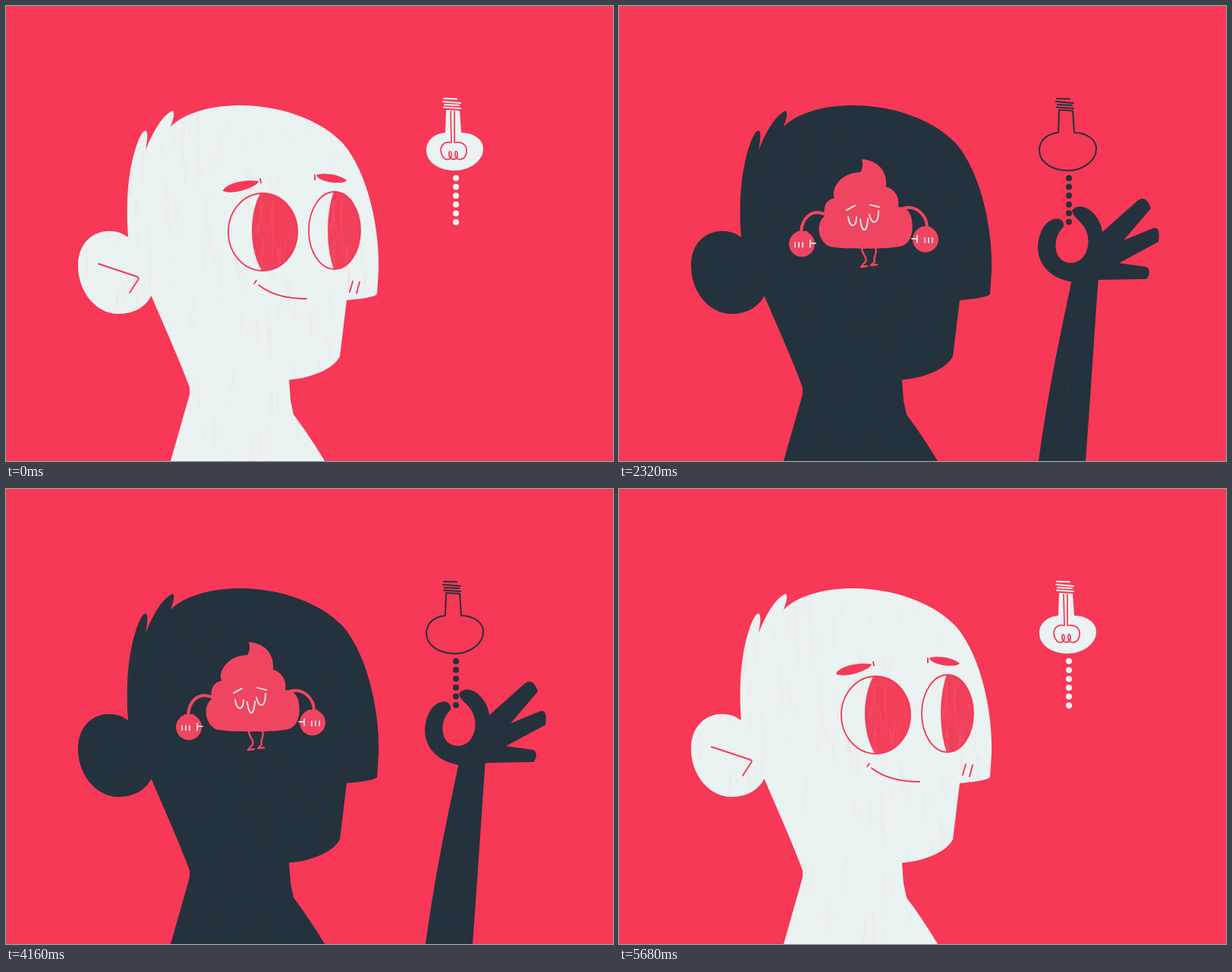
Write an HTML page with a canvas that moves like this. It is 800 px wide and 600 px high and loops after 5760 ms.

```html
<!DOCTYPE html>
<html lang="en">
<head>
<meta charset="utf-8">
<title>Bright idea</title>
<style>
html, body { margin: 0; width: 100%; height: 100%; overflow: hidden; background: #f73856; }
canvas { display: block; width: 800px; height: 600px; }
</style>
</head>
<body>
<canvas id="stage" width="800" height="600"></canvas>
<script>
const ctx = document.getElementById('stage').getContext('2d');
const LOOP = 5760, STEP = 40;
const RED = '#f73856', WHITE = '#ebf2f2', DARK = '#24323d', PINK = '#f04560';
const path = d => new Path2D(d);

const head = path(
  'M217 600L242 512V503C230 470 211 428 191 381L161 305C158 260 160 220 172 184' +
  'C176 172 180 165 184 164C188 167 186 178 184 190C192 170 205 144 220 138' +
  'C223 143 220 150 217 159C235 141 270 131 310 131C363 132 413 149 444 181' +
  'C479 222 493 300 491 350L489 380C485 384 470 386 449 388L440 462' +
  'C432 478 405 490 373 493L375 520L379 539C395 560 408 580 420 600Z' +
  'M192 381C186 394 172 406 148 406C118 406 93 375 95 338C98 296 140 288 161 305L200 340Z');

const faceLines = path(
  'M122 340L173 357Q176 358 174 361L163 378M333 368C348 380 370 386 396 386' +
  'M330 362L327 366M457 363L453 377M466 364L462 379M335 228L336 233M407 223V229');
const brows = path(
  'M286 244C288 236 310 228 333 231C332 238 300 250 286 244Z' +
  'M409 223C418 219 440 222 449 230C445 236 412 233 409 223Z');

const eyes = [
  { x: 338.5, y: 298, rx: 45.5, ry: 51, pw: 45, ph: 75, right: 369, left: 316 },
  { x: 433, y: 296, rx: 34, ry: 51, pw: 34, ph: 80, right: 458, left: 411 }
];

const bulb = path(
  'M580 137L598 138L600 167C616 167 629 176 629 188C629 205 610 217 592 217' +
  'C572 217 554 207 554 190C554 176 566 168 579 167Z');
const thread = path('M577 122L594 122.5M576 126L599 128M578 130L597 131M577 133.5L599 135');
const filament = path(
  'M586 139L587 180C576 178 571 186 574 195C577 204 586 205 587 197C587 190 583 190 584 197' +
  'C586 204 595 204 595 196C595 190 591 190 592 197C595 205 605 204 607 193C608 184 602 178 591 180V139');

const openHand = path(
  'M573 281C582 278 587 284 586 291C577 300 573 312 577 326C583 341 600 342 610 333' +
  'C621 322 621 302 612 290C605 280 598 278 597 270C602 262 615 263 624 272C632 280 636 289 637 298' +
  'L682 258C688 252 696 251 701 267L665 309L704 293C711 291 713 297 711 311L659 339' +
  'L695 344C701 347 699 357 695 360L638 361L600 364C575 362 552 345 552 318C553 300 560 285 573 281Z');
const closedHand = path(
  'M592 269C570 266 557 290 556 315C556 340 570 360 600 362L638 358L695 355C700 351 701 339 695 336' +
  'L659 333L709 304C711 292 709 284 702 287L664 303L695 261C691 246 683 245 677 251L637 296' +
  'C635 288 632 283 628 279C616 266 602 264 592 269Z' +
  'M594 286C606 284 617 298 617 315C616 330 607 338 598 337C586 336 580 323 580 310C580 298 585 290 594 286Z');
const arm = path('M598 355C587 410 568 490 553 600L541 660H610L615 600C621 520 626 440 632 355Z');

const body = path(
  'M320 202C343 203 354 220 352 238C364 242 370 252 368 265C377 265 382 269 385 278' +
  'C389 294 386 311 374 316C362 321 292 321 277 317C261 309 260 285 271 277C269 264 273 255 284 253' +
  'C279 240 293 219 318 219Q323 212 320 202Z');
const faceMarks = path(
  'M300 269L311 263M331 262L343 265M302 278C304 293 313 293 313 278' +
  'M330 275C333 289 342 289 342 270M318 281C320 300 327 300 328 280');
const legs = path(
  'M320 319C320 328 328 331 325 337L319 344L327 343M338 319C341 328 334 331 337 337L332 342L340 341');

const clamp = p => Math.max(0, Math.min(1, p));
const span = (t, a, b) => clamp((t - a) / (b - a));
const ease = p => (1 - Math.cos(Math.PI * p)) / 2;

function rng(seed) {
  let s = seed * 7919 + 17;
  return () => (s = (s * 16807) % 2147483647) / 2147483647;
}

function stroke(p, color, width) {
  ctx.strokeStyle = color;
  ctx.lineWidth = width;
  ctx.stroke(p);
}

function fill(p, color, rule = 'nonzero') {
  ctx.fillStyle = color;
  ctx.fill(p, rule);
}

// Faint crayon streaks inside a shape.
function crayon(p, [x, y, w, h], count, color, seed, rule = 'nonzero') {
  const rnd = rng(seed);
  ctx.save();
  ctx.clip(p, rule);
  ctx.strokeStyle = color;
  for (let i = 0; i < count; i++) {
    const sx = x + rnd() * w, sy = y + rnd() * h, len = 10 + rnd() * 35;
    ctx.lineWidth = 1 + rnd() * 4;
    ctx.beginPath();
    ctx.moveTo(sx, sy);
    ctx.lineTo(sx + rnd() * 8 - 4, sy + len);
    ctx.stroke();
  }
  ctx.restore();
}

function drawEyes(t) {
  const look = ease(span(t, 680, 840)) - ease(span(t, 5400, 5560));
  const seed = t < 680 ? 40 + Math.floor(t / 80) : 40;
  for (const e of eyes) {
    const rim = new Path2D(), pupil = new Path2D();
    rim.ellipse(e.x, e.y, e.rx, e.ry, 0, 0, 7);
    pupil.ellipse(e.right + (e.left - e.right) * look, 296, e.pw, e.ph, 0, 0, 7);
    ctx.save();
    ctx.clip(rim);
    fill(pupil, '#f23f5a');
    crayon(pupil, [e.x - e.rx, 245, e.rx * 2, 90], 22, 'rgba(235,242,242,.04)', seed);
    ctx.restore();
    stroke(rim, RED, 1.8);
  }
}

function drawBulb(lit) {
  stroke(thread, lit ? WHITE : DARK, 2);
  if (lit) {
    fill(bulb, WHITE);
    stroke(filament, RED, 1.7);
  } else {
    stroke(bulb, DARK, 2);
  }
}

function drawChain(stretch, color) {
  ctx.fillStyle = color;
  for (let i = 0; i < 6; i++) {
    const dot = new Path2D();
    dot.arc(593, 227 + i * 11.6 + stretch * (i + 1) / 6, 4, 0, 7);
    stroke(dot, RED, 1.6);
    ctx.fill(dot);
  }
}

function drawHand(dy, closed, color, tint) {
  if (dy >= 360) return;
  const hand = closed ? closedHand : openHand, rule = closed ? 'evenodd' : 'nonzero';
  ctx.save();
  ctx.translate(0, dy);
  fill(arm, color);
  crayon(arm, [553, 360, 80, 240], 45, tint, 5);
  fill(hand, color, rule);
  crayon(hand, [552, 250, 160, 110], 40, tint, 6, rule);
  if (closed) stroke(path('M587 267Q593 272 592 288'), RED, 1.3);
  ctx.restore();
}

function drawGlove(x, y, side) {
  const ball = new Path2D();
  ball.arc(x, y, 17, 0, 7);
  ball.rect(x - 6, y - 17, 13, 7);
  fill(ball, PINK);
  const k = side < 0 ? -9 : -1, c = x - side * 11;
  const marks = new Path2D();
  for (let i = 0; i < 3; i++) {
    marks.moveTo(x + k + i * 5, y - 2);
    marks.lineTo(x + k + i * 5, y + 4);
  }
  marks.moveTo(c, y - 5);
  marks.lineTo(c, y + 4);
  marks.moveTo(c, y - 1);
  marks.lineTo(c - side * 7, y - 1);
  stroke(marks, WHITE, 1.7);
}

function drawCreature(t) {
  const bob = (1 - Math.cos((t - 1760) / 600 * Math.PI * 2)) / 2;
  const lift = -5 * bob, sink = 3 * bob;
  stroke(legs, PINK, 2.4);
  stroke(path(`M270 ${274 + sink}C255 ${268 + sink} 241 ${278 + lift} 240 ${299 + lift}` +
    `M374 ${267 + sink}C390 ${262 + sink} 406 ${274 + lift} 406 ${293 + lift}`), PINK, 4);
  drawGlove(241, 314 + lift, -1);
  drawGlove(404, 308 + lift, 1);
  ctx.save();
  ctx.translate(325, 321);
  ctx.scale(1 + 0.02 * bob, 1 - 0.05 * bob);
  ctx.translate(-325, -321);
  fill(body, PINK);
  stroke(faceMarks, WHITE, 1.8);
  ctx.restore();
}

function pull(dt) {
  if (dt <= 0 || dt >= 400) return 0;
  return 43 * (dt < 200 ? ease(dt / 200) : 1 - ease((dt - 200) / 200));
}

function spring(dt) {
  return dt < 0 || dt > 1100 ? 0 : 6 * Math.exp(-dt / 280) * Math.cos(dt / 55);
}

function handOffset(t) {
  if (t < 700 || t >= 5680) return 400;
  if (t < 1000) {
    const q = span(t, 700, 1000) - 1;
    return -360 * (1.7 * q * q * q + 0.7 * q * q);
  }
  if (t > 5480) {
    const p = span(t, 5480, 5680);
    return 360 * (2 * p * p * p - p * p);
  }
  return pull(t - 1360) + pull(t - 4440);
}

function render(t) {
  const lit = t < 1520 || t >= 4600;
  const closed = (t >= 1320 && t < 1880) || (t >= 4400 && t < 4960);
  const color = lit ? WHITE : DARK;
  const tint = lit ? 'rgba(247,56,86,.025)' : 'rgba(247,56,86,.015)';
  const dy = handOffset(t);
  const stretch = closed ? 5 + dy * 1.18 : spring(t - 1880) + spring(t - 4960);

  ctx.fillStyle = RED;
  ctx.fillRect(0, 0, 800, 600);
  fill(head, color);
  crayon(head, [95, 130, 390, 450], 190, tint, 3);
  if (lit) {
    stroke(faceLines, RED, 1.9);
    fill(brows, RED);
    drawEyes(t);
  } else {
    drawCreature(t);
  }
  drawBulb(lit);
  drawHand(dy, closed, color, tint);
  drawChain(stretch, color);
}

ctx.lineCap = ctx.lineJoin = 'round';
const start = performance.now();
function tick(now) {
  const t = Math.max(0, now - start) % LOOP;
  render(Math.floor(t / STEP) * STEP);
  requestAnimationFrame(tick);
}
render(0);
requestAnimationFrame(tick);
</script>
</body>
</html>
```
